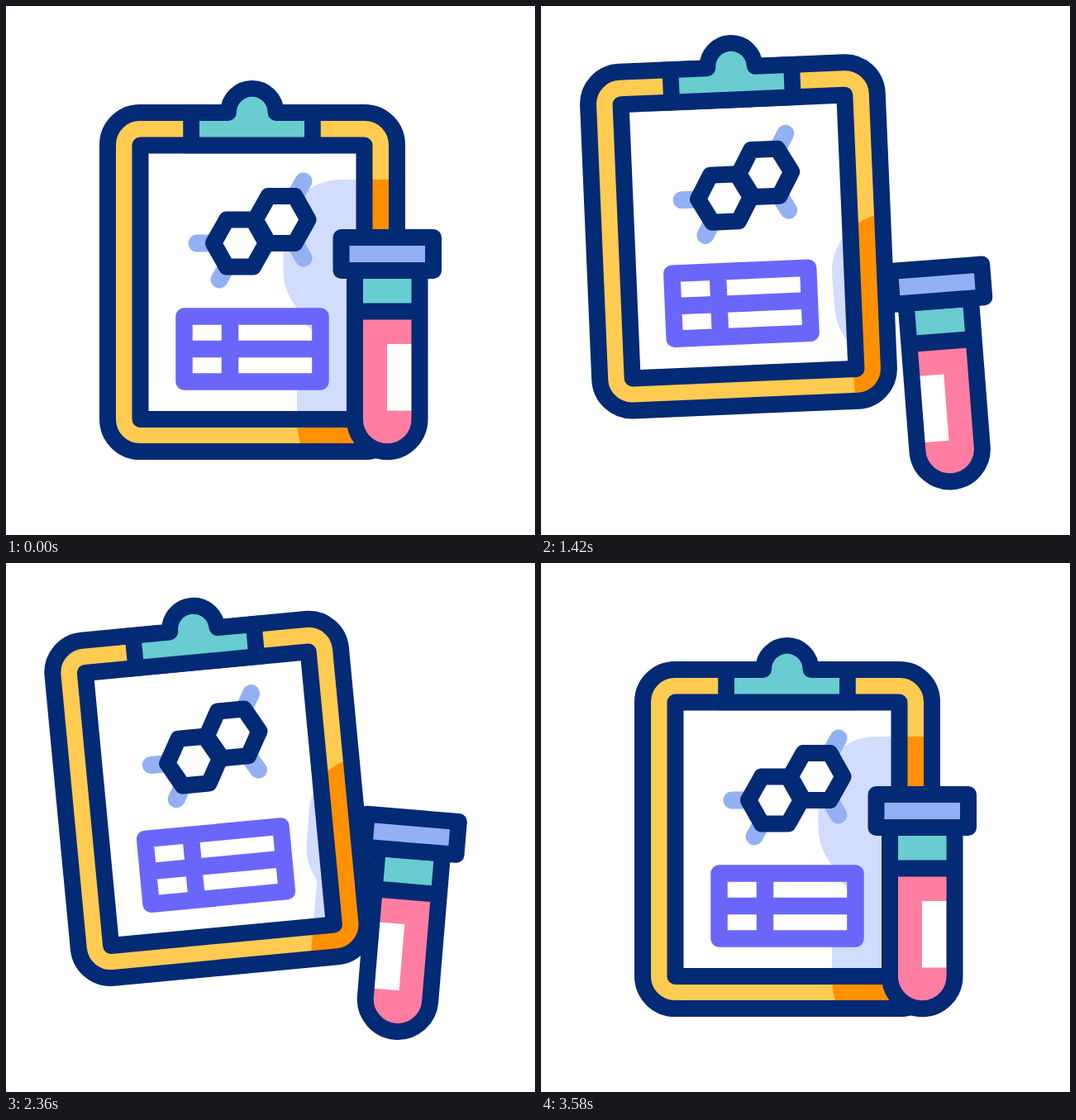
Animation, 640 px wide and 640 px high, one loop 3600 ms. Source, as an HTML page:

```html
<!DOCTYPE html>
<html lang="en">
<head>
<meta charset="utf-8">
<title>Lab report</title>
<style>
  html, body { margin: 0; width: 100%; height: 100%; overflow: hidden; background: #fff; }
  svg { display: block; width: 100%; height: 100%; }
  .line { stroke: #032a75; stroke-width: 20; stroke-linejoin: round; }
</style>
</head>
<body>
<svg viewBox="0 0 640 640" fill="none">
  <defs>
    <rect id="frame" x="123" y="129" width="350" height="410" rx="39"/>
    <rect id="paper" x="162.5" y="168.5" width="271" height="331.5"/>
    <path id="hex" d="M-32 0L-16-28.5H16L32 0L16 28.5H-16Z"/>
    <rect id="cap" x="405.5" y="280" width="111.5" height="40"/>
    <path id="glass" d="M422 320V500a39.25 39.25 0 0 0 78.5 0V320Z"/>
    <g id="shadow" stroke-width="140" stroke-linejoin="round">
      <use href="#cap"/><use href="#glass"/>
    </g>
    <clipPath id="inFrame"><use href="#frame"/></clipPath>
    <clipPath id="inPaper"><use href="#paper"/></clipPath>
    <clipPath id="inGlass"><use href="#glass"/></clipPath>
  </defs>

  <g id="board">
    <use href="#frame" fill="#ffcb51"/>
    <g clip-path="url(#inFrame)">
      <use class="cast" href="#shadow" fill="#ff9100" stroke="#ff9100"/>
    </g>
    <use href="#frame" class="line"/>
    <use href="#paper" fill="#fff"/>
    <g clip-path="url(#inPaper)">
      <use class="cast" href="#shadow" fill="#d2dcfc" stroke="#d2dcfc"/>
    </g>
    <use href="#paper" class="line"/>
    <path d="M234 139H268.5a10.5 10.5 0 0 0 10.5-10.5a18.75 18.75 0 0 1 37.5 0a10.5 10.5 0 0 0 10.5 10.5H361V158.5H234Z"
      fill="#68ccd1" stroke="#032a75" stroke-width="39.5" paint-order="stroke"/>

    <path d="M231 287H262M258 331L274 303M360 212L344 240M360 305L344 277"
      stroke="#93b0f4" stroke-width="21" stroke-linecap="round"/>
    <g class="line" fill="#fff">
      <use href="#hex" x="283" y="287"/>
      <use href="#hex" x="333.5" y="258.5"/>
    </g>

    <path d="M226 385h35v20h-35ZM281 385h81l8 7v13h-89ZM226 425h35v20h-35ZM281 425h89v20h-89Z" fill="#fff"/>
    <path d="M215.5 375.5H380.5V454.5H215.5ZM215.5 415H380.5M271 375.5V454.5"
      stroke="#6b66fb" stroke-width="20.5" stroke-linejoin="round"/>
  </g>

  <g id="tube">
    <use href="#glass" fill="#ff7ea1"/>
    <path d="M422 320H500.5V370H422Z" fill="#68ccd1"/>
    <g clip-path="url(#inGlass)">
      <rect id="label" y="409" width="39.5" height="80.5" fill="#fff"/>
    </g>
    <path d="M422 369.5H500.5" class="line"/>
    <use href="#glass" class="line"/>
    <use href="#cap" class="line" fill="#93b0f4"/>
  </g>
</svg>
<script>
const LOOP = 3600;
const $ = id => document.getElementById(id);
const casts = document.querySelectorAll('.cast');

// Each track is a list of [time, value] keys joined by sine easing.
const boardShift = [[0, 0], [1540, 1], [2080, 1], [3300, 0]];
const boardAngle = [[60, 0], [730, -10], [1140, 5.8], [1500, -3.5], [1850, 0],
  [1930, 0], [2260, -6.5], [2850, 9], [3430, 0]];
const tubeShift = [[180, 0], [1720, 1], [3450, 0]];
const tubeAngle = [[300, 0], [960, 10], [1400, -4.5], [1750, 3.3], [2080, 0],
  [2510, 6.5], [3030, -11], [3520, 0]];
const labelX = [[100, 461], [1060, 421.5], [2240, 421.5], [2980, 436], [3520, 461]];

function at(track, t) {
  const next = track.findIndex(key => key[0] > t);
  if (next === 0) return track[0][1];
  if (next < 0) return track[track.length - 1][1];
  const [t0, v0] = track[next - 1], [t1, v1] = track[next];
  return v0 + (v1 - v0) * Math.sin((t - t0) / (t1 - t0) * Math.PI / 2) ** 2;
}

function draw(now) {
  const t = now % LOOP;
  const b = at(boardShift, t), boardTurn = at(boardAngle, t);
  const k = at(tubeShift, t), tubeTurn = at(tubeAngle, t);
  const x = -60.5 * b, y = -56 * b;
  const tube = `translate(${29 * k} ${40 * k}) rotate(${tubeTurn} 461 410)`;

  $('board').setAttribute('transform', `translate(${x} ${y}) rotate(${boardTurn} 298 320)`);
  $('tube').setAttribute('transform', tube);
  $('label').setAttribute('x', at(labelX, t));
  // Undo the board's pose so the shadow follows the tube.
  for (const cast of casts)
    cast.setAttribute('transform', `rotate(${-boardTurn} 298 320) translate(${-x} ${-y}) ${tube}`);
  requestAnimationFrame(draw);
}
draw(performance.now());
</script>
</body>
</html>
```
